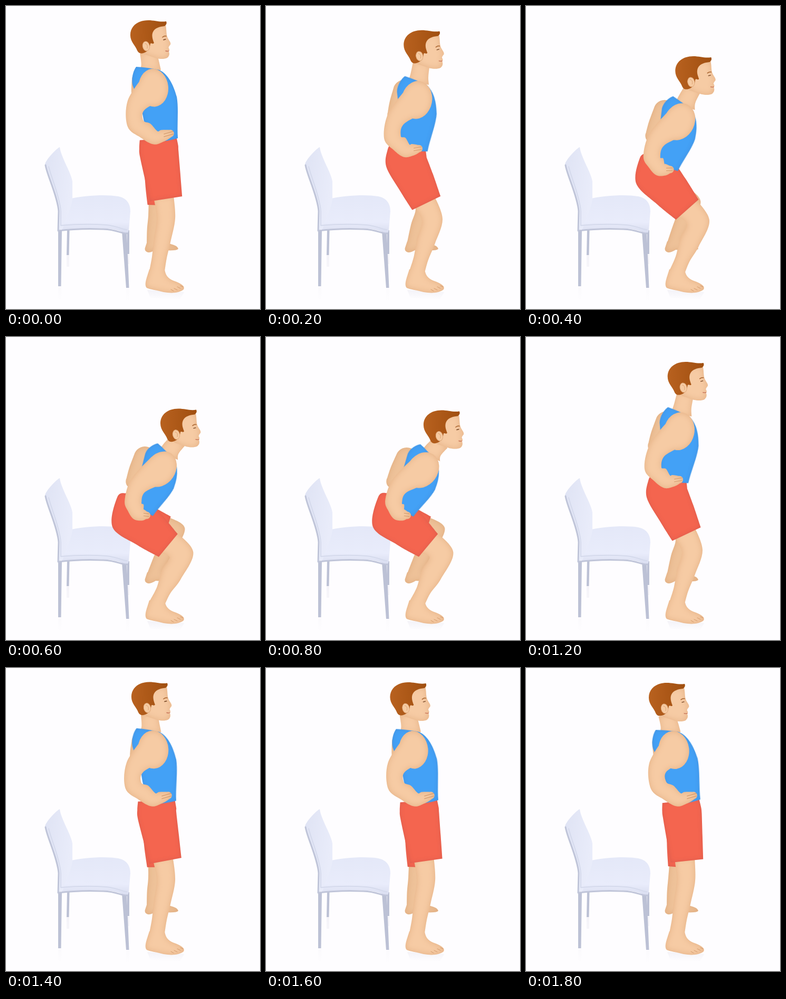
An HTML page that plays this animation: 482x573 px, repeating every 1.9 s.

```html
<!DOCTYPE html>
<html lang="en">
<head>
<meta charset="utf-8">
<title>Chair squat</title>
<style>
html, body { margin: 0; width: 100%; height: 100%; overflow: hidden; background: #fefdff; }
svg { display: block; width: 100vw; height: 100vh; }
.skin { fill: #f6cba4; filter: url(#skinShade); }
.far { fill: #eec299; }
.cloth { fill: #f4654f; filter: url(#clothShade); }
.line { fill: none; stroke-linecap: round; stroke-linejoin: round; }
</style>
</head>
<body>
<svg viewBox="0 0 482 573">
  <defs>
    <filter id="skinShade" color-interpolation-filters="sRGB">
      <feComponentTransfer in="SourceAlpha" result="out"><feFuncA type="linear" slope="-1" intercept="1"/></feComponentTransfer>
      <feGaussianBlur in="out" stdDeviation="6" result="soft"/>
      <feFlood flood-color="#c98550" flood-opacity=".4"/>
      <feComposite in2="soft" operator="in"/>
      <feComposite in2="SourceAlpha" operator="in" result="rim"/>
      <feMerge><feMergeNode in="SourceGraphic"/><feMergeNode in="rim"/></feMerge>
    </filter>
    <filter id="clothShade" color-interpolation-filters="sRGB">
      <feComponentTransfer in="SourceAlpha" result="out"><feFuncA type="linear" slope="-1" intercept="1"/></feComponentTransfer>
      <feGaussianBlur in="out" stdDeviation="4" result="soft"/>
      <feFlood flood-color="#402040" flood-opacity=".13"/>
      <feComposite in2="soft" operator="in"/>
      <feComposite in2="SourceAlpha" operator="in" result="rim"/>
      <feMerge><feMergeNode in="SourceGraphic"/><feMergeNode in="rim"/></feMerge>
    </filter>
    <linearGradient id="hair"><stop offset="0" stop-color="#b8611f"/><stop offset="1" stop-color="#a04f10"/></linearGradient>
    <linearGradient id="back" x2="1" y2=".3"><stop offset="0" stop-color="#dfe3f4"/><stop offset="1" stop-color="#e9ecfa"/></linearGradient>
    <linearGradient id="seat" x2="0" y2="1"><stop offset="0" stop-color="#e4e8f8"/><stop offset=".7" stop-color="#e9ecfb"/><stop offset="1" stop-color="#d8dcef"/></linearGradient>
    <linearGradient id="fade" x2="0" y2="1"><stop offset="0" stop-color="#f4f3f8"/><stop offset="1" stop-color="#fefdff"/></linearGradient>
  </defs>

  <g fill="url(#fade)">
    <path d="M99 531h6v26h-6zM228 534h6v24h-6zM115 471h5v22h-5zM230 470h4v18h-4z"/>
    <path d="M268 537L338 541 330 556 274 552Z"/>
  </g>
  <g fill="#bcc1d5">
    <path d="M116 424h4.500L119.500 471H115zM230 424h4L234 469H230z"/>
    <path d="M99 424h7L104.500 530H99zM220 426h9L233.500 533H228z"/>
  </g>
  <path fill="url(#seat)" d="M118 365C150 358 190 356 213 360C229 363 236 374 236 388L233 424Q231 433 225 430C212 419 165 417 106 424L104 400Z"/>
  <path fill="url(#back)" d="M102 267C96 269 76 290 74 299C74 315 97 358 100 386L100 424L108 421C110 405 124 387 126 365V332C125 318 104 285 102 267Z"/>
  <path class="line" stroke="#c0c5d9" stroke-width="3" d="M75 301C78 320 98 360 100 388L99 425Q140 420 185 422C211 423 219 431 230 430"/>
  <path class="line" stroke="#d5daec" stroke-width="2" d="M81 304C85 322 102 360 104 388L104 415Q150 411 190 414C212 416 221 423 229 423"/>

  <path id="farLeg" class="skin far"/>
  <path id="farArm" class="skin far"/>
  <path id="farShorts" class="cloth"/>
  <path id="leg" class="skin"/>
  <path class="line" stroke="#d39a6c" d="M336 531l-5 -2M331 534l-6 -3M325 537l-6 -3M318 539l-5 -3"/>
  <path id="shorts" class="cloth"/>
  <path id="neck" class="skin"/>
  <g id="torso">
    <path fill="#43a1f6" filter="url(#clothShade)" d="M247 115Q268 116 291 121C308 129 318 150 324 172C328 195 324 225 326 250Q300 258 272 257L261 215 257 194 241 152C237 142 240 124 247 115Z"/>
  </g>
  <path id="arm" class="skin"/>
  <path id="fingers" class="line" stroke="#d39a6c" stroke-width="1.100"/>

  <g id="head">
    <path class="skin" d="M262 50L280 36L303 36C305 45 304 52 306 58C308 64 314 69 312 73C310 76 308 77 309 80C311 82 310 84 309 86C311 90 310 95 306 98C300 101 292 100 286 99L262 91Z"/>
    <path fill="url(#hair)" d="M304 29C306 33 304 36 301 38C292 39 283 41 279 49C276 56 278 62 281 70C278 73 277 69 274 71C273 80 270 86 261 89C254 91 251 88 249 84C246 75 236 68 236 55C236 38 250 27 270 27C283 27 292 31 304 29Z"/>
    <ellipse cx="266" cy="76" rx="6.500" ry="9" fill="#f6cba2" stroke="#e2ad80" transform="rotate(-12 266 76)"/>
    <path class="line" stroke="#dca274" d="M264 71Q270 72 268 80"/>
    <path class="line" stroke="#a8642f" stroke-width="1.500" d="M297 59Q301 56 304 57"/>
    <path class="line" stroke="#70401f" stroke-width="1.300" d="M299 64L303 63"/>
    <path class="line" stroke="#c9755a" stroke-width="1.300" d="M303 85Q307 86 309 85"/>
  </g>
</svg>
<script>
const loop = 1900, step = 100, squat = 1400;
const ankle = [286, 505], farAnkle = [278, 452];
const foot = 'M272 498L301 498C303 512 310 517 322 521C334 526 340 530 337 536C330 542 316 544 299 541C285 537 273 536 267 533C261 527 268 512 272 498Z';
const farFoot = 'M268 445L290 445 312 450Q325 453 327 459Q324 463 305 462L284 461Q276 466 270 466Q262 464 264 457Z';

const $ = id => document.getElementById(id);
const lerp = (a, b, k) => a + (b - a) * k;
const mix = (a, b, k) => a.map((v, i) => lerp(v, b[i], k));
const add = (a, b) => [a[0] + b[0], a[1] + b[1]];
const fmt = p => p.map(v => v.toFixed(1)).join(' ');

// Point at a distance from p, leaning forward from upright by deg.
function polar(p, dist, deg) {
  const a = deg * Math.PI / 180;
  return [p[0] + dist * Math.sin(a), p[1] - dist * Math.cos(a)];
}

function curve(pts) {
  const at = i => pts[Math.max(0, Math.min(pts.length - 1, i))];
  const slope = i => at(i + 1).map((v, j) => (v - at(i - 1)[j]) / 6);
  return fmt(pts[0]) + pts.slice(1).map((b, i) => {
    const s = slope(i), e = slope(i + 1);
    return `C${fmt(add(pts[i], s))} ${fmt([b[0] - e[0], b[1] - e[1]])} ${fmt(b)}`;
  }).join('');
}

// Outline of a limb: a spine of [point, radius] with flat ends.
function limb(...spine) {
  const edge = side => spine.map(([p, r], i) => {
    const a = spine[Math.max(0, i - 1)][0];
    const b = spine[Math.min(spine.length - 1, i + 1)][0];
    const dx = b[0] - a[0], dy = b[1] - a[1], k = side * r / Math.hypot(dx, dy);
    return [p[0] + dy * k, p[1] - dx * k];
  });
  return `M${curve(edge(1))}L${curve(edge(-1).reverse())}Z`;
}

function oval(p, rx, ry, deg = 0) {
  const a = polar(p, ry, deg), b = polar(p, -ry, deg);
  const arc = `A${rx} ${ry} ${deg} 0 1 `;
  return `M${fmt(a)}${arc}${fmt(b)}${arc}${fmt(a)}Z`;
}

// s: depth of the squat, sway: hip shift, lean: extra torso angle.
function stateAt(t) {
  if (t >= squat) {
    const sway = 1 - 5 * Math.cos(Math.PI * (t - squat) / 400);
    return { s: 0, sway, lean: -.4 * sway };
  }
  const s = 1.01 * Math.sin(Math.PI * t / squat) ** 1.15;
  const rise = t > 700 && t < 1300 ? Math.sin(Math.PI * (t - 700) / 600) : 0;
  return { s, sway: 2 * rise, lean: 3.5 * rise };
}

function draw(t) {
  const { s, sway, lean } = stateAt(t);
  const set = (id, d) => $(id).setAttribute('d', d);
  const r = (a, b) => lerp(a, b, s);

  const knee = polar(ankle, 105, r(9.6, 26.8));
  const hip = add(polar(knee, 123, -r(6, 52.7)), [sway, 0]);
  const fromHip = (a, b) => add(hip, mix(a, b, s));
  const turn = r(0, 39.7) + lean;
  const shoulder = polar(hip, r(125, 102), turn - 5);
  const elbow = fromHip([-45, -57], [6, -23]);
  const wrist = fromHip([-7, -30], [16, 1]);
  const tip = fromHip([21, -38], [31, 3]);
  const farKnee = mix([287, 398], [323, 362], s);

  set('farLeg', limb([mix(farKnee, hip, .3), 17], [farKnee, 17],
    [mix(farKnee, farAnkle, .5), 15], [farAnkle, 11]) + farFoot);
  set('leg', limb([mix(knee, hip, .34), r(19, 27)], [knee, r(17.5, 23)],
    [mix(knee, ankle, .4), r(16, 20)], [mix(knee, ankle, .72), 14], [ankle, 14.5]) + foot);

  const waist = polar(hip, 28, turn - 4);
  const hem = add(mix(hip, knee, .7), [4, r(0, 6)]);
  set('farShorts', limb([hip, 28], [mix(hip, farKnee, .45), 25], [mix(hip, farKnee, .82), 19]));
  set('shorts', limb([waist, r(35, 29)], [mix(waist, hip, .55), r(37, 39)],
    [hip, r(37, 42)], [mix(hip, hem, .5), r(34, 37)], [hem, r(31, 28)]));

  const farShoulder = add(shoulder, mix([-20, -14], [-30, -22], s));
  const farElbow = add(elbow, mix([7, -45], [0, -38], s));
  set('farArm', oval(farShoulder, 21, 21) + limb([farShoulder, 21],
    [mix(farShoulder, farElbow, .6), 18], [farElbow, 14]) + oval(farElbow, 14, 14));

  const upper = add(mix(shoulder, elbow, .5), [-16, 0]);
  const palm = mix(wrist, tip, .5);
  set('arm', oval(shoulder, 29, 36, turn - 5) + limb([shoulder, 29], [upper, 18], [elbow, 16],
    [mix(elbow, wrist, .5), 16], [wrist, 13], [palm, 11], [tip, 7]) + oval(tip, 7, 7));
  const along = [tip[0] - palm[0], tip[1] - palm[1]];
  set('fingers', [-3, 2].map(y => `M${fmt(add(palm, [2, y]))}l${fmt(along.map(v => v * 1.25))}`).join(''));

  const head = polar(hip, 215 - 30 * s * s, r(-5, 30.6) + lean);
  const collar = polar(hip, r(158, 131), turn - 6);
  set('neck', limb([add(head, [-2, 22]), 16], [mix(head, collar, .75), 17], [collar, 20]));
  $('head').setAttribute('transform', `translate(${fmt(add(head, [-272, -65]))})`);
  $('torso').setAttribute('transform',
    `translate(${fmt(hip)}) rotate(${turn}) scale(1 ${r(1, .83)}) translate(-290.6 -279)`);
}

let last = -1;
function tick() {
  const t = Math.floor(performance.now() % loop / step) * step;
  if (t !== last) draw(last = t);
  requestAnimationFrame(tick);
}
tick();
</script>
</body>
</html>
```
